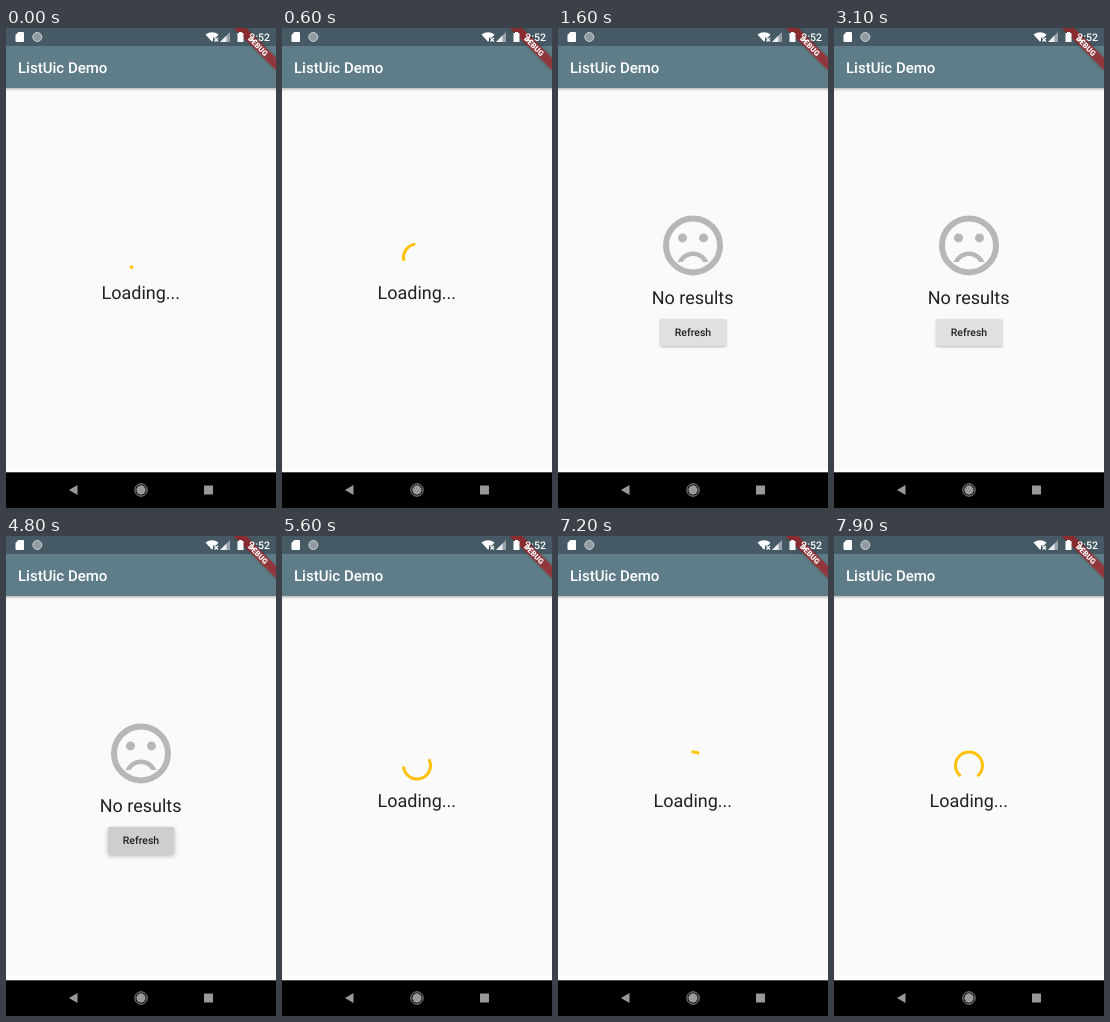
These frames come from a looping animation (270 px wide and 480 px high, 8 s). An HTML page:

```html
<!DOCTYPE html>
<html lang="en">
<head>
<meta charset="utf-8">
<title>List demo</title>
<style>
  html, body { margin: 0; width: 100%; height: 100%; overflow: hidden; background: #fafafa; }
  svg { display: block; width: 270px; height: 480px; font-family: Roboto, "Noto Sans", sans-serif; text-rendering: geometricPrecision; }
  .medium { font-weight: 500; }
  .mid { text-anchor: middle; }
  .body { font-size: 18px; fill: #212121; }
  #button { fill: #e0e0e0; filter: drop-shadow(0 1px 1px #0004); }
  #button.pressed { fill: #cecece; filter: drop-shadow(0 2.5px 2.5px #0004); }
</style>
</head>
<body>
<svg viewBox="0 0 270 480">
  <rect width="270" height="480" fill="#fafafa"/>
  <rect y="440" width="270" height="4.300" fill="#fff"/>

  <!-- App bar -->
  <rect x="-10" width="290" height="60" fill="#5f7d89" style="filter:drop-shadow(0 1.5px 1.5px #0005)"/>
  <rect width="270" height="18" fill="#465a65"/>
  <text class="medium" x="12" y="45" font-size="15" fill="#fff">ListUic Demo</text>

  <!-- Corner banner -->
  <g transform="translate(270 0) rotate(45)">
    <rect x="-30" y="21" width="60" height="9" fill="#b71c1c" fill-opacity=".63" style="filter:drop-shadow(0 0 2px #0005)"/>
    <text class="mid" y="28.200" font-size="7.650" font-weight="900" fill="#fff">DEBUG</text>
  </g>

  <!-- Status bar -->
  <g fill="#fff">
    <path d="M12.300 4H17a1 1 0 0 1 1 1v8a1 1 0 0 1-1 1h-6.500a1 1 0 0 1-1-1V7z"/>
    <circle cx="31.300" cy="9" r="4.500" fill="#909ca2" stroke="#c9cfd2"/>
    <path d="M199.500 6.500q6.500-4.500 13 0L210 9.500h-3v3l-1 1.300z"/>
    <path d="M208.500 10l3.500 3.500m0-3.500l-3.500 3.500" stroke="#fff" stroke-width="1.200"/>
    <path d="M224 4v10h-10z" fill-opacity=".45"/>
    <path d="M220.500 7.500v6.500h-6.500z" fill-opacity=".8"/>
    <path d="M233 4h3v1h1.500v9h-6V5h1.500z"/>
    <text class="medium" x="264" y="13" font-size="10.500" text-anchor="end">2:52</text>
  </g>

  <g id="loading">
    <circle id="arc" r="13.500" pathLength="360" fill="none" stroke="#ffc107" stroke-width="3" stroke-linecap="square"/>
    <text class="body mid" x="134.800" y="271">Loading...</text>
  </g>

  <g id="results">
    <g transform="translate(99 181.400) scale(3)" fill="#b7b7b7">
      <circle cx="12" cy="12" r="9" fill="none" stroke="#b7b7b7" stroke-width="2"/>
      <circle cx="8.500" cy="9.500" r="1.500"/>
      <circle cx="15.500" cy="9.500" r="1.500"/>
      <path d="M12 14c-2.330 0-4.320 1.450-5.120 3.500h1.670c.69-1.190 1.970-2 3.450-2s2.750.81 3.450 2h1.670c-.8-2.050-2.790-3.500-5.120-3.500z"/>
    </g>
    <text class="body mid" x="134.600" y="276">No results</text>
    <rect id="button" x="102.200" y="291" width="66" height="27" rx="1.500"/>
    <text class="medium mid" x="135" y="308" font-size="10.500" fill="#212121">Refresh</text>
  </g>

  <!-- Navigation bar -->
  <rect y="444.300" width="270" height="36" fill="#000"/>
  <g fill="#999">
    <path d="M63 462l8.500-5v10z"/>
    <circle cx="135" cy="462" r="4.700"/>
    <circle cx="135" cy="462" r="6.200" fill="none" stroke="#999"/>
    <rect x="198" y="457.500" width="9" height="9" rx=".5"/>
  </g>
</svg>
<script>
const LOOP = 8000, STEP = 100;
const RESULTS = 1300, PRESS = 4800, RELOAD = 5400;
// [time in ms, spinner phase in turns of its cycle]
const FIRST = [[0, 1.025], [600, 1.72], [1100, 2.26]];
const SECOND = [[5400, 0.02], [5600, 0.226], [6500, 1.167], [7900, 2.5]];
const $ = id => document.getElementById(id);
const clamp = x => Math.min(1, Math.max(0, x));

function along(keys, t) {
  let i = 1;
  while (i < keys.length - 1 && t > keys[i][0]) i++;
  const [t0, a] = keys[i - 1], [t1, b] = keys[i];
  return a + (b - a) * clamp((t - t0) / (t1 - t0));
}

// cubic-bezier(.4, 0, .2, 1)
function ease(x) {
  let lo = 0, hi = 1;
  for (let i = 0; i < 20; i++) {
    const u = (lo + hi) / 2, v = 1 - u;
    if (1.2 * v * v * u + 0.6 * v * u * u + u ** 3 < x) lo = u; else hi = u;
  }
  return lo * lo * (3 - 2 * lo);
}

function drawSpinner(phase) {
  const turn = Math.floor(phase), p = phase - turn;
  const head = 270 * ease(clamp(2 * p)), tail = 270 * ease(clamp(2 * p - 1));
  const start = -90 + tail + 306 * p - 144 * turn;
  $("arc").setAttribute("transform", `translate(135 229.5) rotate(${start})`);
  $("arc").setAttribute("stroke-dasharray", `${Math.max(head - tail, 0.1)} 360`);
}

function draw(now) {
  const t = Math.floor(now % LOOP / STEP) * STEP;
  const loading = t < RESULTS || t >= RELOAD;
  $("loading").style.display = loading ? "" : "none";
  $("results").style.display = loading ? "none" : "";
  $("button").classList.toggle("pressed", t >= PRESS);
  if (loading) drawSpinner(along(t < RESULTS ? FIRST : SECOND, t));
  requestAnimationFrame(draw);
}
draw(0);
</script>
</body>
</html>
```
